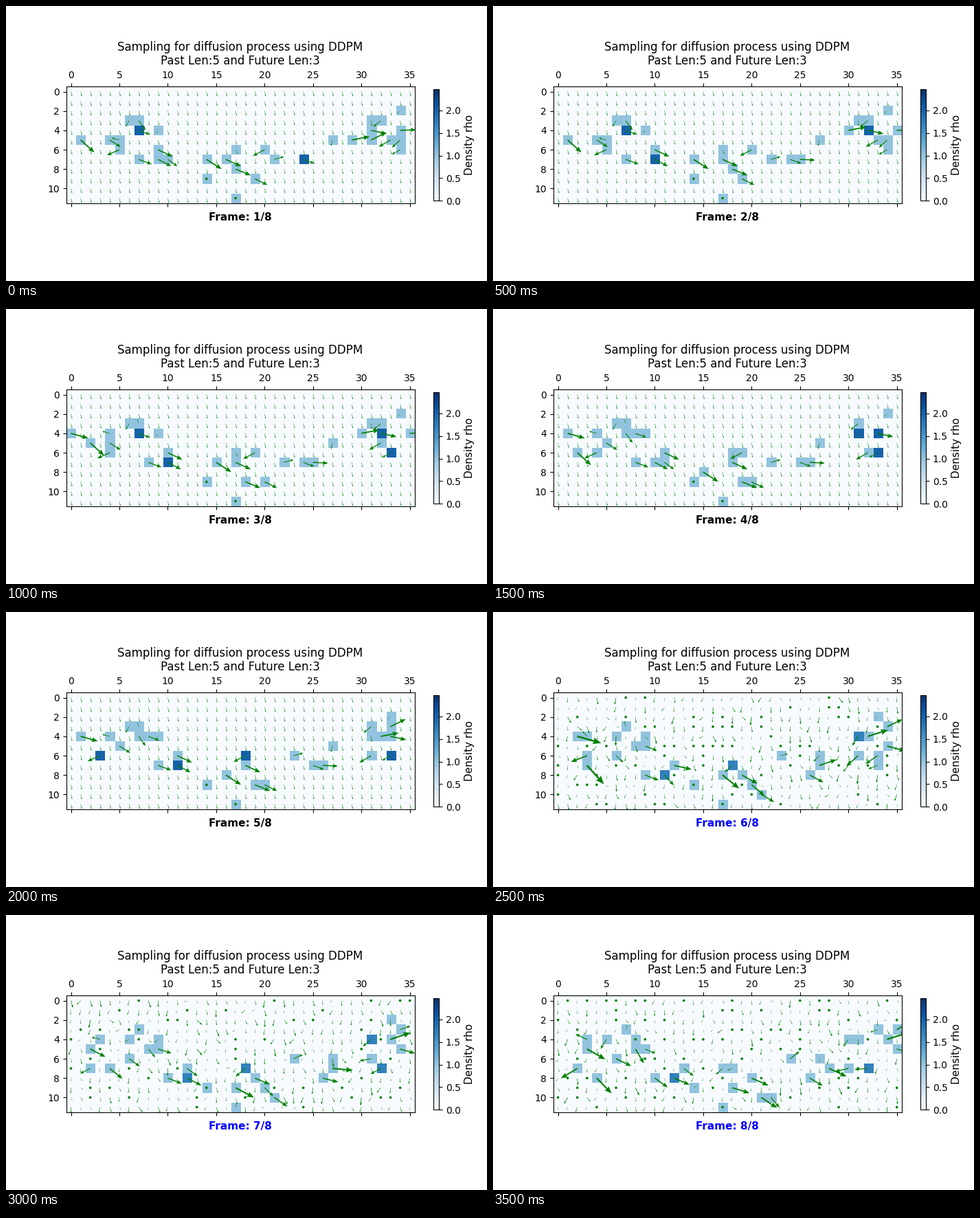
A matplotlib script that plays this animation: 700x400 px, repeating every 4 s.

```python
import matplotlib.pyplot as plt
import numpy as np
from matplotlib.animation import FuncAnimation

ROWS, COLS = 12, 36
STEPS, PAST = 8, 5
CELL = 14.09  # pixels per grid cell
PACE = 0.024  # cells walked per step for each pixel of arrow
DRIFT = (1.6, 7.0)  # arrow of an empty cell, in pixels
STILL = 0.17  # share of empty cells without flow in the sampled future

# Each walker: first column and row, then its arrow in pixels.
WALKERS = [
    (1, 4.55, 20, 18), (3.6, 4.5, 16, 10), (4.8, 4.6, -11, -3),
    (5, 5.5, -18, 8), (6.3, 2.6, -5, 9), (6.5, 3.1, 10, 14),
    (7, 3.7, -2, -6), (6.6, 3.8, 16, 6), (9, 3.8, -3, 4), (7, 6.7, 19, 7),
    (9, 5.5, 21, 10), (9.7, 6.5, 14, 10), (9.1, 6.5, 19, 10),
    (13.9, 6.7, 22, 14), (14, 9, 0, 0), (16, 6.5, 22, 10),
    (17.3, 5.8, 3, 6), (17, 8.2, 22, 9), (17, 11, 0, 0),
    (18.7, 8.55, 18, 9), (20, 5.5, -17, 9), (21.3, 6.8, 14, -4),
    (24, 7, 22, 1), (23.6, 6.8, 16, 6), (27.2, 4.55, -2, 9),
    (29.2, 4.6, 26, -5), (31, 3, 1, 8), (32.1, 2.55, -11, 9),
    (31, 4.5, 22, -11), (31, 3.9, 23, 5), (33, 4.9, -17, 10),
    (34.2, 4, 23, -1), (34, 5.1, -12, 11), (34, 5.7, -12, 7),
    (33.8, 2, -4, 3), (-1.15, 3.6, 25, 7),
]


def sampled_flow(rng):
    """Noisy downward flow with some cells at rest."""
    flow = rng.normal((0.3, 6.2), (2.4, 2.4), (ROWS, COLS, 2))
    size = np.hypot(flow[..., 0], flow[..., 1])
    flow *= (np.maximum(size, 4.4) / size)[..., None]
    flow[rng.random((ROWS, COLS)) < STILL] = 0
    return flow


def state(step):
    """Density and flow of the grid at one step."""
    sampled = step >= PAST
    rng = np.random.default_rng(step)
    rho = np.zeros((ROWS, COLS))
    flow = sampled_flow(rng) if sampled else np.full((ROWS, COLS, 2), DRIFT)
    crowd = 1.7 if sampled else 2
    jitter = 4 if sampled else 0
    for col, row, dx, dy in WALKERS:
        c = int(np.floor(col + PACE * dx * step + 0.5))
        r = int(np.floor(row + PACE * dy * step + 0.5))
        if 0 <= c < COLS and 0 <= r < ROWS:
            rho[r, c] = crowd if rho[r, c] else 1
            flow[r, c] = rng.normal((dx, dy), jitter)
    return rho, flow


states = [state(step) for step in range(STEPS)]

fig, ax = plt.subplots(figsize=(7, 4), dpi=100)
image = ax.matshow(states[0][0], cmap="Blues", vmin=0, vmax=2.475)
ax.autoscale(False)
arrows = ax.quiver(
    *np.meshgrid(np.arange(COLS), np.arange(ROWS)),
    np.zeros((ROWS, COLS)), np.zeros((ROWS, COLS)),
    color="green", angles="xy", scale_units="xy", scale=1, width=0.008,
    headwidth=4, headlength=5, headaxislength=4.5, minshaft=3, minlength=1)
ax.set_title("Sampling for diffusion process using DDPM\n"
             "Past Len:5 and Future Len:3", fontsize=12)
bar = fig.colorbar(image, ax=ax, fraction=0.015, pad=0.05)
bar.set_label("Density rho", fontsize=11)
label = fig.text(341 / 700, 88 / 400, "", ha="center", va="baseline",
                 fontsize=11, fontweight="bold")


def draw(i):
    rho, flow = states[i]
    image.set_data(rho)
    arrows.set_UVC(flow[..., 0] / CELL, flow[..., 1] / CELL)
    label.set_text(f"Frame: {i + 1}/{STEPS}")
    label.set_color("black" if i < PAST else "blue")
    return image, arrows, label


anim = FuncAnimation(fig, draw, frames=STEPS, interval=500, repeat=True,
                     init_func=lambda: draw(0))
plt.show()
```
